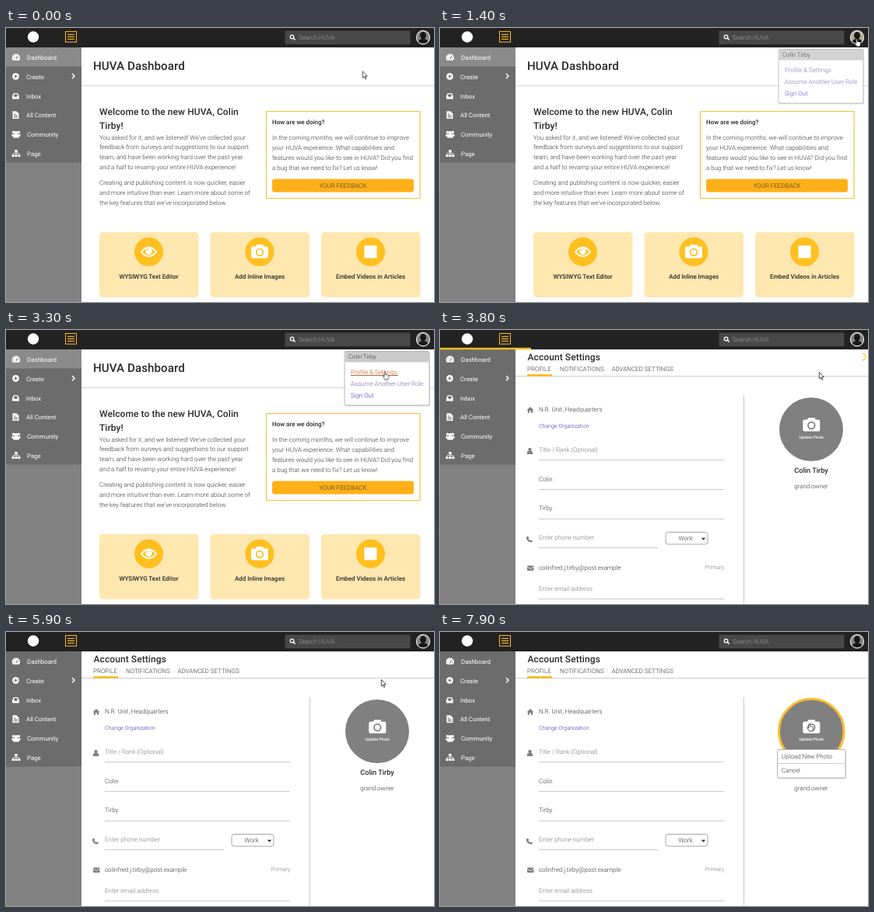
Recreate the animation shown at these times as an HTML page. Size 550 px wide and 353 px high, loop 8 s.

```html
<!DOCTYPE html>
<html lang="en">
<head>
<meta charset="utf-8">
<title>Account settings walkthrough</title>
<style>
html, body { margin: 0; width: 100%; height: 100%; overflow: hidden; background: #fff; }
svg.stage { display: block; width: 100vw; height: 100vh; }
text { font: 300 8px Roboto, "Open Sans", sans-serif; fill: #333; letter-spacing: -.02px; text-rendering: geometricPrecision; }
.body text { letter-spacing: .01px; }
.bold, .bold text { font-weight: 500; fill: #2a2a2a; }
.h1 { font-size: 15.1px; font-weight: 500; fill: #2a2a2a; letter-spacing: .08px; }
.h2 { font-size: 12px; font-weight: 500; fill: #2a2a2a; letter-spacing: .08px; }
.nav text { font-size: 7.9px; font-weight: 400; fill: #fff; }
.mid { text-anchor: middle; }
.hint { fill: #777; }
.rule { stroke: #cbcbcb; stroke-width: 1; fill: none; }
.visited { fill: #7a5ca8; }
.blue { fill: #3534bc; }

/* one shared 8 s clock, nudged so that 100 ms steps land cleanly */
.a { animation: 8s step-end -20ms infinite; }
.home { animation-name: home; }
.account { animation-name: account; }
.menu { animation-name: menu; }
.hover { animation-name: hover; }
.face { animation-name: face; }
.cursor { animation-name: move; }
.arrow { animation-name: arrow; }
.hand { animation-name: hand; }
.bar { animation-name: bar; transform-origin: 0 0; }
.load { animation-name: load; }
.spin { animation: spin .4s steps(4) -20ms infinite; transform-origin: 542.5px 34.5px; }
.ring { animation-name: ring; }
.upload { animation-name: upload; }

@keyframes home { 0% { opacity: 1 } 45%, 100% { opacity: 0 } }
@keyframes account { 0% { opacity: 0 } 45%, 100% { opacity: 1 } }
@keyframes menu { 0% { opacity: 0 } 16.25% { opacity: .55 } 17.5% { opacity: .85 } 18.75% { opacity: 1 } 45%, 100% { opacity: 0 } }
@keyframes hover { 0% { opacity: 0 } 35% { opacity: 1 } 45%, 100% { opacity: 0 } }
@keyframes face { 0% { fill: #858585 } 10% { fill: #b5a88e } 26.25%, 100% { fill: #858585 } }
@keyframes move {
  0% { transform: translate(458px, 55.5px) }
  1.25% { transform: translate(483px, 50px) }
  2.5% { transform: translate(483px, 50px); animation-timing-function: steps(6) }
  10% { transform: translate(535.5px, 14px) }
  25% { transform: translate(535.5px, 14px); animation-timing-function: steps(9) }
  36.25% { transform: translate(487px, 54px) }
  70% { transform: translate(487px, 54px); animation-timing-function: steps(3) }
  73.75% { transform: translate(482px, 61px); animation-timing-function: steps(6) }
  81.25%, 100% { transform: translate(474.5px, 118px) }
}
@keyframes arrow { 0% { opacity: 1 } 8.75% { opacity: 0 } 27.5% { opacity: 1 } 35% { opacity: 0 } 45% { opacity: 1 } 77.5%, 100% { opacity: 0 } }
@keyframes hand { 0% { opacity: 0 } 8.75% { opacity: 1 } 27.5% { opacity: 0 } 35% { opacity: 1 } 45% { opacity: 0 } 77.5%, 100% { opacity: 1 } }
@keyframes bar {
  0% { transform: scaleX(0); opacity: 0 }
  43.75% { transform: scaleX(.06); opacity: 1; animation-timing-function: steps(3) }
  47.5% { transform: scaleX(.2127); opacity: 1; animation-timing-function: steps(9) }
  58.75% { transform: scaleX(.3945); opacity: 1; animation-timing-function: steps(5) }
  65% { transform: scaleX(.5); opacity: 1; animation-timing-function: steps(2) }
  67.5% { transform: scaleX(1); opacity: 1 }
  70%, 100% { transform: scaleX(1); opacity: 0 }
}
@keyframes load { 0% { opacity: 0 } 45% { opacity: 1 } 68.75%, 100% { opacity: 0 } }
@keyframes spin { to { transform: rotate(360deg) } }
@keyframes ring { 0% { opacity: 0 } 77.5%, 100% { opacity: 1 } }
@keyframes upload { 0% { opacity: 0 } 86.25% { opacity: .5 } 87.5%, 100% { opacity: 1 } }
</style>
</head>
<body>
<svg class="stage" viewBox="0 0 550 353" preserveAspectRatio="none">
  <defs>
    <g id="camera">
      <path fill="#fff" d="M-9-6.5h3.6l1.4-2.6h8l1.4 2.6h3.6q2 0 2 2v11q0 2-2 2h-18q-2 0-2-2v-11q0-2 2-2z"/>
      <circle cy="1" r="4.3" fill="none" stroke="currentColor" stroke-width="1.8"/>
    </g>
    <clipPath id="head"><circle cx="536" cy="12" r="8"/></clipPath>
  </defs>

  <rect width="550" height="353" fill="#fff"/>

  <!-- dashboard -->
  <g class="a home">
    <text class="h1" x="112" y="53.5">HUVA Dashboard</text>
    <path class="rule" d="M97 74.5H550" style="stroke:#d6d6d6"/>
    <text class="h2" x="120" y="111.5">Welcome to the new HUVA, Colin</text>
    <text class="h2" x="120" y="129.5">Tirby!</text>
    <g class="body">
      <text x="120" y="143.5">You asked for it, and we listened! We've collected your</text>
      <text x="120" y="156.4">feedback from surveys and suggestions to our support</text>
      <text x="120" y="169.3">team, and have been working hard over the past year</text>
      <text x="120" y="182.2">and a half to revamp your entire HUVA experience!</text>
      <text x="120" y="202.3">Creating and publishing content is now quicker, easier</text>
      <text x="120" y="215.2">and more intuitive than ever. Learn more about some of</text>
      <text x="120" y="228.1">the key features that we've incorporated below.</text>
    </g>
    <rect x="334.5" y="107.5" width="197.5" height="112" fill="#fff" stroke="#f5c64f" stroke-width="1.3"/>
    <text class="bold" x="342" y="123.5">How are we doing?</text>
    <g class="body">
      <text x="342" y="144">In the coming months, we will continue to improve</text>
      <text x="342" y="157">your HUVA experience. What capabilities and</text>
      <text x="342" y="170">features would you like to see in HUVA? Did you find</text>
      <text x="342" y="183">a bug that we need to fix? Let us know!</text>
    </g>
    <rect x="342" y="194.5" width="182" height="17" rx="3.5" fill="#ffb018"/>
    <text class="mid" x="433" y="205.8">YOUR FEEDBACK</text>

    <g fill="#ffe7b0">
      <rect x="120" y="263" width="127.5" height="84" rx="4.5"/>
      <rect x="262.5" y="263" width="127.5" height="84" rx="4.5"/>
      <rect x="405" y="263" width="127.5" height="84" rx="4.5"/>
    </g>
    <g fill="#ffc020">
      <circle cx="183.5" cy="288.3" r="18.6"/>
      <circle cx="326" cy="288.3" r="18.6"/>
      <circle cx="468.5" cy="288.3" r="18.6"/>
    </g>
    <path d="M174 288.3q9.5-11.6 19 0q-9.5 11.6-19 0z" fill="none" stroke="#fff" stroke-width="1.9" stroke-linejoin="round"/>
    <circle cx="183.5" cy="287.6" r="4.3" fill="#fff"/>
    <path d="M181 287.4q.2-2.2 2.5-2.4" fill="none" stroke="#ffc020"/>
    <use href="#camera" x="326" y="288" color="#ffc020"/>
    <rect x="460.5" y="280.3" width="16" height="16" fill="#fff"/>
    <g class="bold mid">
      <text x="183.5" y="323">WYSIWYG Text Editor</text>
      <text x="326" y="323">Add Inline Images</text>
      <text x="468.5" y="323">Embed Videos in Articles</text>
    </g>
  </g>

  <!-- account settings -->
  <g class="a account">
    <text class="h2" x="112.5" y="38.7">Account Settings</text>
    <text x="112" y="53">PROFILE</text>
    <text class="hint" x="148" y="53">·</text>
    <text x="154" y="53">NOTIFICATIONS</text>
    <text class="hint" x="214.5" y="53">·</text>
    <text x="220.5" y="53">ADVANCED SETTINGS</text>
    <path class="rule" d="M97 59.5H550M390.5 84V353"/>
    <rect x="112" y="57" width="32" height="2.6" fill="#fdbc22"/>

    <g fill="#808080">
      <path d="M111.5 103.3l4.5-4.3 4.5 4.3h-1.3v3.4h-2.2v-2.6h-2v2.6h-2.2v-3.4z"/>
      <circle cx="115.5" cy="154" r="2.2"/>
      <path d="M111.8 160v-1.6q0-2.4 2.2-2.4h3q2.2 0 2.2 2.4v1.6z"/>
      <path d="M113 265.8l1.4 2-1 1q.8 1.7 2.5 2.5l1-1 2 1.3q-.3 2-2 2-5.6-.8-6-6 .2-1.7 2.1-1.8z"/>
      <rect x="112" y="303.5" width="8.4" height="6.6" rx=".8"/>
    </g>
    <path d="M112 304.8l4.2 3 4.2-3" fill="none" stroke="#fff" stroke-width=".8"/>

    <text x="127" y="105.3">N.R. Unit, Headquarters</text>
    <text class="blue" x="127" y="125.7" style="font-size:7.1px">Change Organization</text>
    <text class="hint" x="127" y="157">Title / Rank (Optional)</text>
    <text x="127" y="194.5">Colin</text>
    <text x="127" y="232.3">Tirby</text>
    <text class="hint" x="127" y="270">Enter phone number</text>
    <text x="127" y="309.3">colinfred.j.tirby@post.example</text>
    <text class="hint" x="365" y="307.8" text-anchor="end" style="font-size:7.1px">Primary</text>
    <text class="hint" x="127" y="335.6">Enter email address</text>
    <path class="rule" d="M127 167.5H365M127 205.5H365M127 243.5H365M127 280.5H280M127 346.5H365"/>
    <rect x="290" y="260.5" width="54" height="15.5" rx="3" fill="#fff" stroke="#a5a5a5"/>
    <text x="306.5" y="271">Work</text>
    <path d="M335.8 267.8h5.4l-2.7 3z" fill="#333"/>

    <circle cx="477" cy="128" r="41" fill="#808080"/>
    <circle class="a ring" cx="477.3" cy="128" r="41.8" fill="none" stroke="#fdbc2c" stroke-width="3"/>
    <use href="#camera" x="477.3" y="122" color="#808080"/>
    <text class="mid" x="477.3" y="140" style="font-size:5.2px;font-weight:500;fill:#fff">Update Photo</text>
    <text class="bold mid" x="477" y="184.3" style="font-size:9.2px">Colin Tirby</text>
    <text class="mid" x="477" y="204">grand.owner</text>

    <g class="a upload">
      <rect x="434" y="152.3" width="88" height="37" rx="1.5" fill="#ddd"/>
      <rect x="433.5" y="151.5" width="87.5" height="36.5" rx="1.5" fill="#fff" stroke="#b4b4b4"/>
      <path class="rule" d="M434 169.5H521"/>
      <text x="439" y="162.8">Upload New Photo</text>
      <text x="439" y="181">Cancel</text>
    </g>
  </g>

  <!-- sidebar -->
  <rect y="25" width="97" height="328" fill="#828282"/>
  <rect y="25" width="97" height="148.5" fill="#6c6c6c"/>
  <rect class="a home" y="25" width="97" height="24.5" fill="#8a8a8a"/>
  <g class="nav">
    <text x="27" y="41">Dashboard</text>
    <text x="26" y="65.8">Create</text>
    <text x="26" y="90.5">Inbox</text>
    <text x="26" y="115.2">All Content</text>
    <text x="27" y="140">Community</text>
    <text x="27" y="164.8">Page</text>
  </g>
  <g fill="#fff">
    <path d="M8.9 41.8a5.2 5.2 0 1 1 8 0z"/>
    <circle cx="12.5" cy="62.3" r="4.4"/>
    <path d="M8 88l1.8-4h5.4l1.8 4v3.6H8z"/>
    <path d="M8.5 107.3h5l3 3v6.7h-8z"/>
    <circle cx="9.6" cy="134.3" r="1.7"/><circle cx="16.4" cy="134.3" r="1.7"/><circle cx="13" cy="135" r="2.3"/>
    <path d="M7.4 139.5v-2.2q2-1.6 3.4-.4h4.4q1.4-1.2 3.4.4v2.2h-1.8v2H9.2v-2z"/>
    <path d="M11.3 157h3.4v3h-3.4zM7.6 163h3v3h-3zM11.5 163h3v3h-3zM15.4 163h3v3h-3z"/>
  </g>
  <path d="M9.1 162.6v-1.2h7.8v1.2M13 160v2.6" fill="none" stroke="#fff" stroke-width=".8"/>
  <path d="M12.9 40.3l1.8-4.3M9.5 38.5h1M15.8 38.5h1M10.6 35.6l.6.6M12.9 34.2v.8M10.2 62.3h4.6M12.5 60v4.6M10 113h5M10 115h5M10 111h2.5" fill="none" stroke="#6c6c6c"/>
  <path d="M9.8 87.8l1-2.6h3.4l1 2.6h-1.4l-.6 1.2h-1.4l-.6-1.2z" fill="#6c6c6c"/>
  <path d="M85 59l3 3.1-3 3.1" fill="none" stroke="#fff" stroke-width="1.4"/>

  <!-- top bar -->
  <rect width="550" height="25" fill="#222"/>
  <circle cx="35" cy="11.5" r="7.2" fill="#fff"/>
  <rect x="76.5" y="4.5" width="14" height="13.6" fill="none" stroke="#eeb02c" stroke-width="1.1"/>
  <path d="M79 8.4h9M79 11.4h9M79 14.4h9" stroke="#eeb02c" stroke-width="1.2"/>
  <rect x="358.5" y="3.5" width="161" height="17.5" rx="1" fill="#484848"/>
  <circle cx="367.6" cy="11.4" r="2.3" fill="none" stroke="#fff" stroke-width="1.3"/>
  <path d="M369.4 13.2l2.2 2.2" stroke="#fff" stroke-width="1.5"/>
  <text x="376" y="14.8" style="fill:#a2a2a2">Search HUVA</text>
  <circle class="a face" cx="536" cy="12" r="8.6" stroke="#f0f0f0" stroke-width="1.1"/>
  <g clip-path="url(#head)" fill="#161616">
    <ellipse cx="536" cy="9.7" rx="3.9" ry="4.6"/>
    <ellipse cx="536" cy="19" rx="7" ry="5"/>
  </g>

  <rect class="a bar" y="22.8" width="550" height="2.4" fill="#fdbc22"/>
  <g class="a load">
    <path class="spin" d="M542.5 30.2a4.3 4.3 0 0 0 0 8.6" fill="none" stroke="#f7c02f" stroke-width="1.3"/>
  </g>

  <!-- user menu -->
  <g class="a menu">
    <path d="M532.5 27.5l3-3 3 3z" fill="#e6e6e6"/>
    <rect x="435" y="28" width="110" height="70.3" rx="2" fill="#d8d8d8"/>
    <rect x="435" y="27.5" width="109" height="69.5" rx="2" fill="#fff" stroke="#b8b8b8"/>
    <rect x="435.5" y="28" width="108" height="13.5" fill="#cbcbcb"/>
    <text x="440" y="37.3" style="font-size:7.8px">Colin Tirby</text>
    <text class="visited" x="443" y="57">Profile &amp; Settings</text>
    <text class="visited" x="443" y="72">Assume Another User Role</text>
    <text class="blue" x="443" y="86.7">Sign Out</text>
    <g class="a hover">
      <rect x="442" y="48" width="64" height="12" fill="#fff"/>
      <text x="443" y="57" style="fill:#b4531f">Profile &amp; Settings</text>
      <path d="M443 58.5h61" stroke="#b4531f" stroke-width=".9"/>
    </g>
  </g>

  <!-- pointer -->
  <g class="a cursor" fill="#fff" stroke="#222" stroke-width=".8" stroke-linejoin="round">
    <path class="a arrow" d="M.3.3v8.6l2-1.9 1.4 3.2 1.3-.6-1.4-3.1h2.7z"/>
    <g transform="scale(.9)">
      <path class="a hand" d="M-.9 6.4V1.2q0-1 .9-1t.9 1v2.9q.8-.5 1.5.1.9-.4 1.5.3 1.4-.2 1.4 1.1v2q0 1.6-1 2.6v.9H0v-.8l-2.9-3.6q-.5-1 .5-1.3.7 0 1.5 1z"/>
    </g>
  </g>
</svg>
</body>
</html>
```
